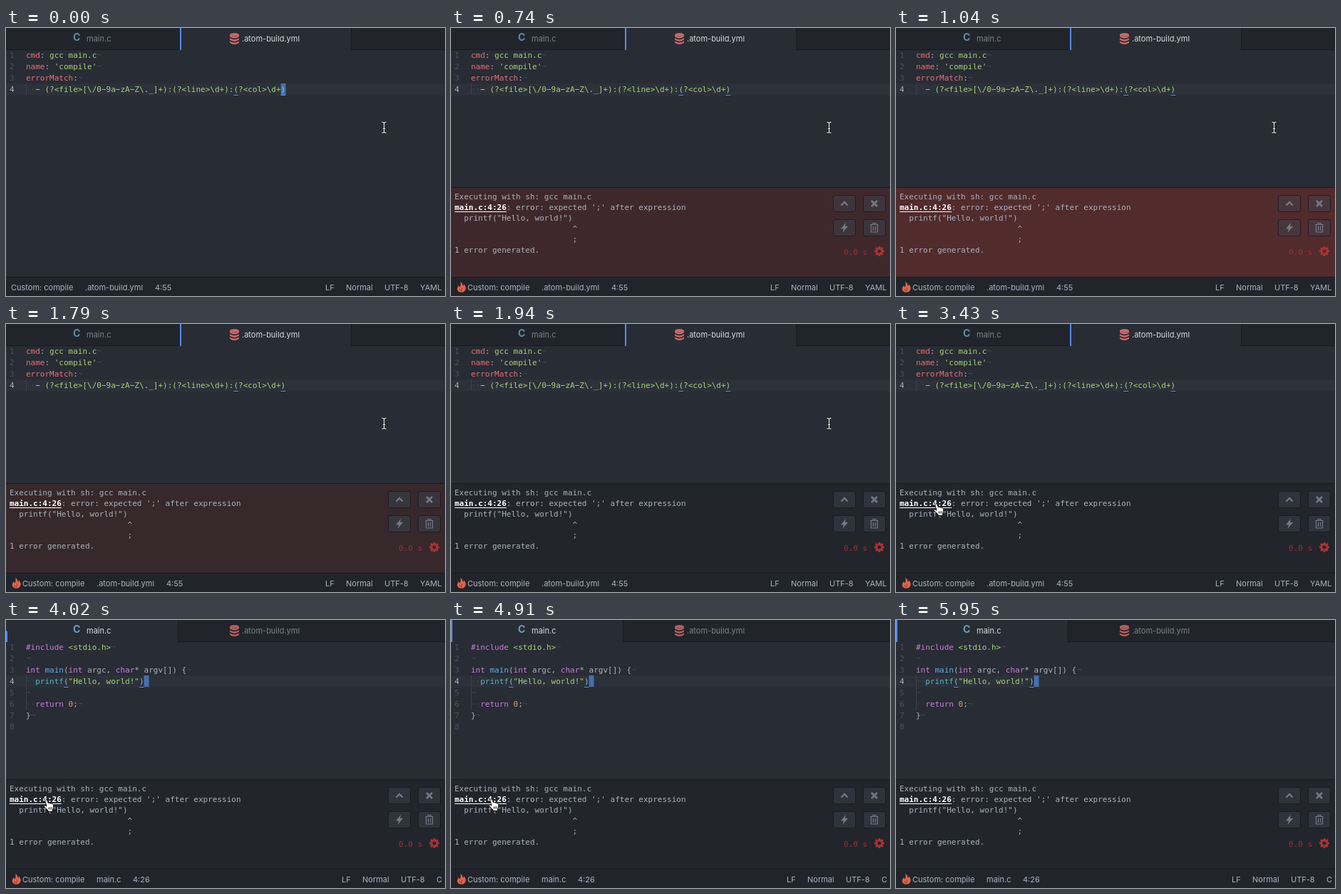
Write an HTML page with a canvas that moves like this. It is 616 by 377 pixels and loops after 6.7 s.

```html
<!DOCTYPE html>
<html lang="en">
<head>
<meta charset="utf-8">
<title>Build error matching</title>
<style>
html, body { margin: 0; width: 100%; height: 100%; overflow: hidden; background: #282c34; }
canvas { display: block; width: 616px; height: 377px; }
</style>
</head>
<body>
<canvas id="stage"></canvas>
<script>
const W = 616, H = 377, LOOP = 6700, CHAR = 6.622;
const MONO = '11px "DejaVu Sans Mono", monospace';
const UI = '11px Inter, sans-serif';
const C = {
  bg: '#282c34', bar: '#21252b', edge: '#181a1f', line: '#2c313a',
  text: '#abb2bf', bright: '#d7dae0', dim: '#7b818c', ghost: '#434852', blue: '#568af2',
  red: '#e5707a', green: '#a9d07a', purple: '#cf7be0', sky: '#61afef',
  cyan: '#56b6c2', orange: '#d9a06a'
};

const canvas = document.getElementById('stage');
const g = canvas.getContext('2d');
const ratio = window.devicePixelRatio || 1;
canvas.width = W * ratio;
canvas.height = H * ratio;

function rect(x, y, w, h, color) {
  g.fillStyle = color;
  g.fillRect(x, y, w, h);
}

function text(str, x, y, color, font) {
  g.font = font;
  g.fillStyle = color;
  g.fillText(str, x, y);
}

// The wide minus suits the code font better than its short hyphen.
function mono(str, x, y, color, font = MONO) {
  text(str.replace(/-/g, '\u2212'), x, y, color, font);
}

function shape(d, fill, stroke, width = 1) {
  const p = new Path2D(d);
  if (fill) { g.fillStyle = fill; g.fill(p); }
  if (stroke) { g.strokeStyle = stroke; g.lineWidth = width; g.stroke(p); }
}

function at(x, y, draw) {
  g.save();
  g.translate(x, y);
  draw();
  g.restore();
}

/* ---------- documents ---------- */

const config = {
  lines: [
    [['cmd', C.red], [': ', C.text], ['gcc main.c', C.green]],
    [['name', C.red], [': ', C.text], ["'compile'", C.green]],
    [['errorMatch', C.red], [':', C.text]],
    [['  - ', C.green], ['(?<file>[\\/0-9a-zA-Z\\._]+):(?<line>\\d+):(?<col>\\d+)', C.green]]
  ],
  guide: 1, brackets: [44, 54], caret: 54, last: 3,
  file: '.atom-build.yml', pos: '4:55', posX: 98,
  right: [['LF', 448], ['Normal', 477], ['UTF-8', 531], ['YAML', 581]]
};

const source = {
  lines: [
    [['#include', C.purple], [' ', C.text], ['<stdio.h>', C.green]],
    [],
    [['int', C.purple], [' ', C.text], ['main', C.sky], ['(', C.text], ['int', C.purple],
      [' argc, ', C.text], ['char', C.purple], ['* argv[]) {', C.text]],
    [['  ', C.text], ['printf', C.cyan], ['(', C.text], ['"Hello, world!"', C.green], [')', C.text]],
    [],
    [['  ', C.text], ['return', C.purple], [' ', C.text], ['0', C.orange], [';', C.text]],
    [['}', C.text]],
    []
  ],
  guide: 3, brackets: [8, 24], caret: 25, last: 7,
  file: 'main.c', pos: '4:26', posX: 51,
  right: [['LF', 471], ['Normal', 500], ['UTF-8', 554], ['C', 604]]
};

function editor(doc, showCaret) {
  rect(0, 31, W, 320, C.bg);
  rect(0, 78, W, 17, C.line);
  rect(28, 78, 1, 16 * doc.guide, '#3d424c');
  if (showCaret) rect(28 + doc.caret * CHAR, 78, 7, 16, '#456fae');
  doc.lines.forEach((parts, i) => {
    const y = 42 + 16 * i;
    let col = 0;
    mono(String(i + 1), 5, y, i === 3 ? C.text : '#4b5260');
    for (const [str, color] of parts) {
      const lead = col === 0 ? str.length - str.trimStart().length : 0;
      mono('·'.repeat(lead), 28, y, C.ghost);
      mono(str, 28 + col * CHAR, y, color);
      col += str.length;
    }
    if (i < doc.last && !(i === 3 && showCaret)) mono('¬', 28 + col * CHAR, y, C.ghost);
  });
  for (const b of doc.brackets) rect(28 + b * CHAR, 94, CHAR, 1, C.blue);
}

/* ---------- tabs and status ---------- */

function database(x, y, color) {
  at(x, y, () => {
    for (let i = 0; i < 3; i++) {
      const t = 3 + i * 4.2;
      shape(`M0 ${t}Q6.5 ${t + 4} 13 ${t}V${t + 2.3}Q6.5 ${t + 6.8} 0 ${t + 2.3}Z`, color);
    }
    g.beginPath();
    g.ellipse(6.5, 2.4, 6.5, 2.4, 0, 0, 7);
    g.fill();
  });
}

function tabs(second, grow) {
  rect(0, 0, W, 31, C.bar);
  rect(0, 30, W, 1, C.edge);
  const x = second ? 244 : 0, w = second ? 240 : 241;
  rect(x, 0, w, 31, C.bg);
  rect(x + w, 0, 1, 31, C.edge);
  rect(x, 31 - 31 * grow, 2, 31 * grow, C.blue);
  text('C', 94, 18, second ? '#5f8ca3' : '#6a9fba', 'bold 14px Inter, sans-serif');
  text('main.c', 113, 19, second ? C.dim : C.bright, UI);
  database(314, 7, second ? '#c96a6a' : '#b56060');
  text('.atom-build.yml', 331, 19, second ? C.bright : C.dim, UI);
}

function status(doc, failed) {
  rect(0, 350, W, 27, C.bar);
  rect(0, 350, W, 1, C.edge);
  const x = failed ? 23 : 7;
  if (failed) {
    at(8, 357, () => {
      shape('M5 0C9 2 8 5 9 6C10 5 10 4 9.600 3C13 6 14 11 10 14C9 15 3 15.500 1.500 12.500C-.5 9 2 7 3 5C3.500 7 4 7 4.500 7.500C6 5 6 2 5 0Z', '#e0664a');
      shape('M7 8C8 10 6 11 7 13C5 13 4 12 4 10', null, '#7c3a35', 1);
    });
  }
  text('Custom: compile', x, 369, C.text, UI);
  text(doc.file, x + 104, 369, C.text, UI);
  text(doc.pos, x + 104 + doc.posX, 369, C.text, UI);
  for (const [str, rx] of doc.right) text(str, rx, 369, C.text, UI);
}

/* ---------- build panel ---------- */

const buttons = [
  [536, 235, () => shape('M-4.500 2.500L0 -2L4.500 2.500', null, '#747a85', 2.4)],
  [578, 235, () => shape('M-4 -4L4 4M4 -4L-4 4', null, '#747a85', 2.6)],
  [536, 269, () => shape('M2 -7L-5 1.500H-1L-2.500 7L5 -2H1Z', '#747a85')],
  [578, 269, () => shape('M-5.500 -4.500H5.500M-2 -4.500V-6.500H2V-4.500M-4.500 -4V6H4.500V-4M-1.500 -2V4M1.500 -2V4', null, '#747a85', 1.2)]
];

function gear(x, y, color) {
  at(x, y, () => {
    g.strokeStyle = color;
    g.lineWidth = 3;
    g.beginPath();
    g.arc(0, 0, 4, 0, 7);
    g.stroke();
    for (let i = 0; i < 8; i++) {
      g.rotate(Math.PI / 4);
      rect(-1.4, -7, 2.8, 3, color);
    }
  });
}

function panel(flash) {
  rect(0, 224, W, 126, '#22252b');
  rect(0, 225, W, 125, `rgba(82, 43, 44, ${flash})`);
  rect(0, 224, W, 1, C.edge);
  const out = [
    'Executing with sh: gcc main.c',
    "           : error: expected ';' after expression",
    '  printf("Hello, world!")',
    ' '.repeat(25) + '^',
    ' '.repeat(25) + ';',
    '1 error generated.'
  ];
  out.forEach((str, i) => mono(str, 5, 241 + 15 * i, C.text));
  mono('main.c:4:26', 5, 256, '#ffffff', 'bold ' + MONO);
  rect(5, 258, 73, 1, '#ffffff');
  for (const [x, y, icon] of buttons) {
    g.beginPath();
    g.roundRect(x + .5, y + .5, 31, 23, 2.5);
    g.fillStyle = 'rgba(62, 68, 81, .45)';
    g.fill();
    g.strokeStyle = 'rgba(24, 26, 31, .8)';
    g.lineWidth = 1;
    g.stroke();
    at(x + 16, y + 12, icon);
  }
  mono('0.0 s', 551, 319, '#9c3034');
  gear(601, 314, '#a83434');
}

/* ---------- pointer ---------- */

const pointers = {
  beam() {
    const d = 'M-3 -7.500H-1.500L0 -6.500L1.500 -7.500H3M0 -6.500V6.500M-3 7.500H-1.500L0 6.500L1.500 7.500H3M-1.500 1.500H1.500';
    shape(d, null, 'rgba(0, 0, 0, .35)', 2.4);
    shape(d, null, '#f2f2f2', 1.1);
  },
  arrow() {
    shape('M.5 .5V14.500L3.800 11.500L6 17L8.300 16L6 10.800H10.500Z', '#111', '#fff', 1);
  },
  hand() {
    shape('M3.500 1.500C4.500 .5 5.500 1 6 2L7.500 6C8 5 9.500 5 10 6.300C11 5.500 12 6 12.400 7C13.500 6.500 14.500 7.200 14.500 8.500C15 11 14.500 13 13.500 14.500V17.500H7V16C5 14 3.500 12 1.500 10.500C.8 9.500 2 8.300 3.500 9.200L5 10.200L3 3.500C2.800 2.500 3 2 3.500 1.500Z', '#fff', '#111', 1);
    shape('M8 11.500V14.500M10 11.300V14.500M12 11V14.500', null, '#111', .9);
  }
};

// [start ms, kind, x, y]
const track = [
  [0, 'beam', 530.5, 140], [2830, 'arrow', 198, 318], [2980, 'arrow', 104, 319.5],
  [3130, 'arrow', 91, 271], [3280, 'hand', 59, 258.5], [3430, 'hand', 52, 252],
  [4910, 'hand', 52, 251], [5060, 'beam', 122, 161], [5210, 'beam', 158, 123],
  [5360, 'beam', 195, 101], [5500, 'beam', 211, 100], [5650, 'beam', 214, 100],
  [5800, 'beam', 359, 223], [5950, null, 0, 0]
];
const flashes = [[740, .6], [890, 1], [1790, .42], [1940, 0]];
const marker = [[0, 1], [4020, .5], [4170, 30 / 31], [4320, 1]];

const pick = (list, t) => list.findLast(step => step[0] <= t);

function frame(now) {
  const t = now % LOOP;
  const first = t < 4020, built = t >= 740;
  const doc = first ? config : source;
  g.setTransform(ratio, 0, 0, ratio, 0, 0);
  editor(doc, !built || !first);
  tabs(first, pick(marker, t)[1]);
  if (built) panel(pick(flashes, t)[1]);
  status(doc, built);
  const [, kind, x, y] = pick(track, t);
  if (kind) at(x, y, pointers[kind]);
}

const start = performance.now();
function tick() {
  frame(performance.now() - start);
  requestAnimationFrame(tick);
}
tick();
</script>
</body>
</html>
```
